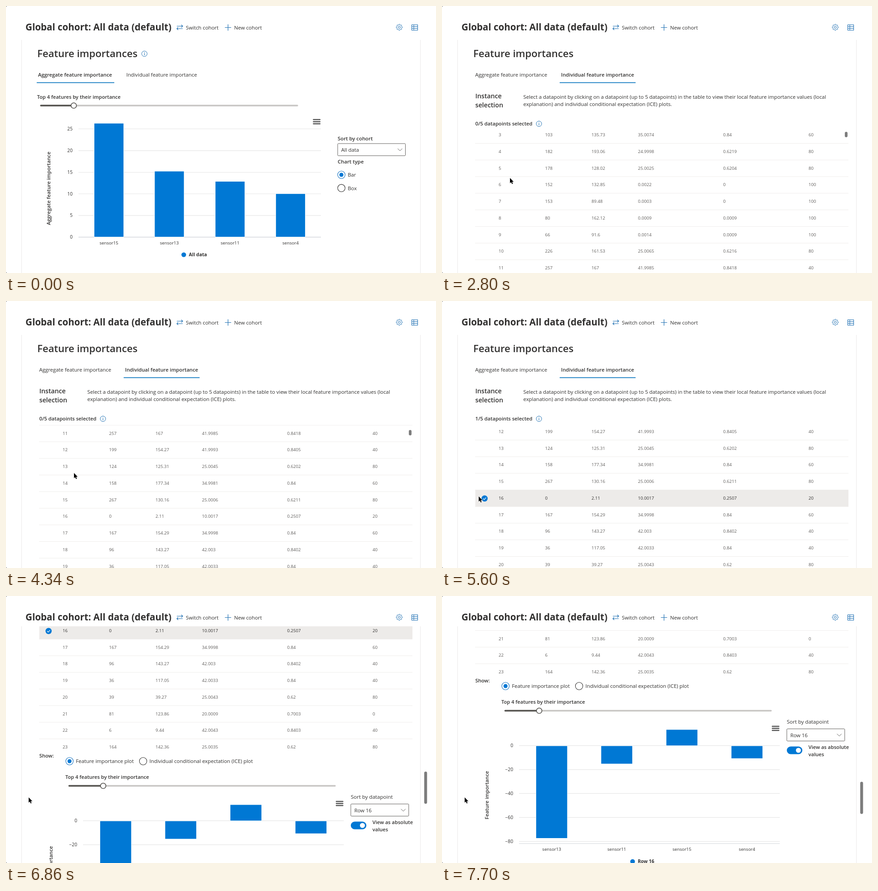
Animation of 949x590 px, one loop 8 s. Source, as an HTML page:

```html
<!DOCTYPE html>
<html lang="en">
<head>
<meta charset="utf-8">
<title>Feature importances</title>
<style>
  html, body { margin: 0; width: 100%; height: 100%; overflow: hidden; background: #fff; }
  svg { display: block; width: 949px; height: 590px; font-family: "Open Sans", "Noto Sans", sans-serif; }
</style>
</head>
<body>
<svg id="stage" viewBox="0 0 949 590"></svg>
<script>
const INK = '#323130', GREY = '#605e5c', BLUE = '#0078d4', ICON = '#2272b4';
const LOOP = 8000, TICK = 70;

// y is the middle of the capital letters
function text(x, y, str, o = {}) {
  const { size = 11.35, weight = 400, fill = INK, anchor = 'start', id = '' } = o;
  return `<text x="${x}" y="${(y + size * .357).toFixed(2)}" font-size="${size}" font-weight="${weight}"` +
    ` fill="${fill}" text-anchor="${anchor}"${id && ` id="${id}"`}>${str}</text>`;
}
const bold = (x, y, str, size = 11.2, o = {}) => text(x, y, str, { size, weight: 600, ...o });
const rect = (x, y, w, h, fill, more = '') =>
  `<rect x="${x}" y="${y}" width="${w}" height="${h}" fill="${fill}" ${more}/>`;
const path = (d, stroke, w = 1, more = '') =>
  `<path d="${d}" fill="none" stroke="${stroke}" stroke-width="${w}" ${more}/>`;
const circle = (x, y, r, fill, stroke = 'none', w = 1) =>
  `<circle cx="${x}" cy="${y}" r="${r}" fill="${fill}" stroke="${stroke}" stroke-width="${w}"/>`;
const group = (id, body, more = '') => `<g id="${id}" ${more}>${body}</g>`;

const info = (x, y) => circle(x, y, 6, 'none', ICON) +
  path(`M${x} ${y - 1}v4.2M${x} ${y - 3.4}v1.3`, ICON, 1.1);

const menu = (x, y) =>
  path(`M${x} ${y - 4.6}h14.4M${x} ${y}h14.4M${x} ${y + 4.6}h14.4`, '#555', 2.5, 'stroke-linecap="round"');

const slider = (x, end, thumb, y) =>
  path(`M${x} ${y}H${end}`, '#c8c6c4', 3.4, 'stroke-linecap="round"') +
  path(`M${x} ${y}H${thumb}`, '#55534f', 3.4, 'stroke-linecap="round"') +
  circle(thumb, y, 6, '#fff', '#55534f', 1.7);

const radio = (x, y, label, on) =>
  circle(x, y, 8.2, '#fff', on ? '#106ebe' : INK, 1.1) +
  (on ? circle(x, y, 4.5, BLUE) : '') + text(x + 14, y + .3, label);

const select = (x, y, w, label) =>
  rect(x, y, w, 26.8, '#fff', `stroke="${GREY}" rx="1.5"`) +
  text(x + 7.7, y + 14, label) +
  path(`M${x + w - 17} ${y + 11}l5 5 5-5`, GREY);

function chart(c) {
  let s = c.grid.map(([v, y]) =>
    path(`M${c.x0} ${y}H${c.x1}`, '#e6e6e6', 1.2) +
    text(c.x0 - 13, y, v, { size: 10.2, anchor: 'end' })).join('');
  s += path(`M${c.x0} ${c.base}H${c.x1}`, '#cfd3da', 1.2);
  c.bars.forEach(([name, x, top, bottom]) => {
    s += rect(x - 1, top - 1, c.w + 2, bottom - top + 2, '#fff') + rect(x, top, c.w, bottom - top, BLUE) +
      text(x + c.w / 2, c.base + 12.6, name, { size: 9.7, anchor: 'middle' });
  });
  const [tx, ty, title] = c.title;
  s += `<g transform="translate(${tx} ${ty}) rotate(-90)">${bold(0, 0, title, 11.2, { anchor: 'middle' })}</g>`;
  const [lx, ly, legend] = c.legend;
  return s + circle(lx, ly, 5.2, BLUE) + text(lx + 11.3, ly, legend, { size: 10.4, weight: 700 }) + menu(...c.menu);
}

// TrueY, PredictedY, settings1..3
const ROWS = `219 169.66 0.0009 0 100|68 64.87 9.9984 0.2508 20|67 55.71 35.0068 0.8417 60
103 135.73 35.0074 0.84 60|182 193.06 24.9998 0.6219 80|178 128.02 25.0025 0.6204 80
152 132.85 0.0022 0 100|153 89.48 0.0003 0 100|80 162.12 0.0009 0.0009 100
66 91.6 0.0014 0.0009 100|226 161.53 25.0065 0.6216 80|257 167 41.9985 0.8418 40
199 154.27 41.9993 0.8405 40|124 125.31 25.0045 0.6202 80|158 177.34 34.9981 0.84 60
267 130.16 25.0006 0.6211 80|0 2.11 10.0017 0.2507 20|167 154.29 34.9998 0.84 60
96 143.27 42.003 0.8402 40|36 117.05 42.0033 0.84 40|39 39.27 25.0043 0.62 80
81 123.86 20.0009 0.7003 0|6 9.44 42.0043 0.8403 40|164 142.36 25.0035 0.62 80`
  .split(/[|\n]/).map((r, i) => [i, ...r.trim().split(' ')]);
const COLS = [125, 227.5, 330, 432.5, 620.5, 809];
const HEADS = ['Index', 'TrueY', 'PredictedY', 'settings1', 'settings2', 'settings3'];
const PITCH = 36.75, PICKED = 16;

function table() {
  let s = HEADS.map((h, i) => bold(COLS[i], 307, h, 11.1)).join('') + path('M73 325H897', '#e9e7e5');
  ROWS.forEach((row, i) => {
    const y = 343 + i * PITCH;
    const cells = fill => row.map((v, c) => text(COLS[c], y, v, { size: 9.65, fill })).join('');
    s += path(`M73 ${y + 18.75}H897`, '#efedeb') + cells(GREY);
    if (i === PICKED) {
      s += group('picked', rect(73.5, y - 18, 823.5, 36.7, '#edebe9') +
        circle(94, y + .9, 6.8, BLUE) +
        path(`M90.8 ${y + 1}l2.3 2.3 4.2-4.4`, '#fff', 1.2) + cells(INK));
    }
  });
  return s;
}

const gear = () => {
  let d = '';
  for (let i = 0; i < 32; i++) {
    const a = (i - .5) / 32 * 2 * Math.PI, r = i % 4 < 2 ? 6.8 : 5.2;
    d += `${i ? 'L' : 'M'}${(868 + r * Math.cos(a)).toFixed(2)} ${(47 + r * Math.sin(a)).toFixed(2)}`;
  }
  return path(d + 'Z', ICON, 1) + circle(868, 47, 2.4, 'none', ICON);
};

const header = text(43, 47, 'Global cohort: All data (default)', { size: 20.55, weight: 700 }) +
  path('M377 44.5H390M387 41.5l3 3-3 3M390 50H377M380 47l-3 3 3 3', ICON, 1.1) +
  text(397, 47.5, 'Switch cohort') +
  path('M483 47.5H497M490 40.5V54.5', ICON, 1.2) + text(503.5, 47.5, 'New cohort') + gear() +
  path('M895.5 41.5H908.5V53.5H895.5ZM895.5 45.5H908.5M895.5 49.5H908.5M900 41.5V53.5', ICON, 1.1) +
  '<path d="M0 0H2L0 2ZM0 590H2L0 588Z" fill="#777"/>';

const aggregate = info(305.5, 105.5) +
  bold(68.5, 201, 'Top 4 features by their importance', 11.08) + slider(77, 643, 149.5, 220) +
  chart({
    x0: 160, x1: 695, base: 510.6, w: 64.3,
    grid: [[25, 271.5], [20, 319.7], [15, 367.5], [10, 415], [5, 462.8], [0, 510.6]],
    bars: [['sensor15', 195, 259.6, 510], ['sensor13', 328.3, 365.5, 510],
      ['sensor11', 462.3, 388, 510], ['sensor4', 595.8, 415.2, 510]],
    title: [94, 403, 'Aggregate feature importance'],
    legend: [392.3, 549.6, 'All data'], menu: [678.5, 255.7]
  }) +
  bold(732, 292.5, 'Sort by cohort', 11.35) + select(732, 304, 149.5, 'All data') +
  bold(732, 344, 'Chart type', 11.35) +
  radio(740.2, 373, 'Bar', true) + radio(740.2, 402.3, 'Box', false);

const plot = bold(73.5, 186.5, 'Show:') +
  radio(140.2, 199, 'Feature importance plot', true) +
  radio(302.6, 199, 'Individual conditional expectation (ICE) plot', false) +
  bold(131, 234.5, 'Top 4 features by their importance', 11.1) + slider(139.5, 726, 214.5, 253.5) +
  chart({
    x0: 170, x1: 745.5, base: 547, w: 68.5,
    grid: [['0', 330.7], ['−20', 383.6], ['−40', 436.4], ['−60', 489.4], ['−80', 542.4]],
    bars: [['sensor13', 207.8, 331.5, 535], ['sensor11', 351.4, 331.5, 370.6],
      ['sensor15', 495.2, 295.5, 330.3], ['sensor4', 638.8, 331.5, 358.7]],
    title: [99, 440, 'Feature importance'],
    legend: [420.6, 586.7, 'Row 16'], menu: [729, 292.5]
  }) +
  text(761, 278, 'Sort by datapoint', { size: 11.5 }) + select(761, 293.6, 127.8, 'Row 16') +
  rect(761, 332.4, 34.3, 17.2, BLUE, 'rx="8.6"') + circle(786.6, 341, 5.5, '#fff') +
  bold(808.8, 334, 'View as absolute', 11.1) + bold(808.8, 350, 'values', 11.1);

const individual =
  bold(73.5, 199, 'Instance', 14.2) + bold(73.5, 219.3, 'selection', 14.2) +
  text(179.5, 201, 'Select a datapoint by clicking on a datapoint (up to 5 datapoints) in the table to view their local feature importance values (local') +
  text(179.5, 217, 'explanation) and individual conditional expectation (ICE) plots.') +
  bold(73.5, 260.3, '0/5 datapoints selected', 11.2, { id: 'count' }) + info(214, 260.3) +
  `<g clip-path="url(#tableClip)">${group('rows', table())}${rect(889, 0, 6, 12, '#7d7d7d', 'id="rowBar" rx="3"')}</g>` +
  `<g transform="translate(0 525)">${plot}</g>`;

const page = path('M34.5 75V1300M914.5 75V1300', '#ebe9e8') +
  bold(69, 105, 'Feature importances', 22.05) +
  group('tabsA', bold(70.7, 152, 'Aggregate feature importance', 11.28) +
    text(265.5, 152, 'Individual feature importance', { size: 11.3, id: 'hoverTab' })) +
  group('tabsB', text(73.2, 152, 'Aggregate feature importance', { size: 11.4 }) +
    bold(262.8, 152, 'Individual feature importance', 11.2)) +
  path('M0 0', '#0f78c0', 1.8, 'id="underline"') +
  group('agg', aggregate) + group('ind', individual);

const OUTLINE = 'stroke="#fff" stroke-width="1.3" paint-order="stroke" stroke-linejoin="round"';
const cursors =
  group('arrow', `<path d="M0 0V11.6L2.7 9.2 4.5 13.4 6.4 12.6 4.6 8.4H8.2Z" fill="#000" ${OUTLINE}/>`) +
  group('hand', '<path d="M3 0c1 0 1.4.6 1.4 1.4V5.5l4.2.8c1.2.3 1.8 1 1.6 2.2l-.7 5H3.5L.2 9.2c-.8-1 .3-2 1.4-1.1V1.4C1.6.6 2 0 3 0Z" fill="#fff" stroke="#000" stroke-width=".9"/>') +
  group('beam', path('M-3-7Q0-7 0-5 0-7 3-7M0-5V5M-3 7Q0 7 0 5 0 7 3 7M-1.5 1.5h3', '#222', 1.2));

document.getElementById('stage').innerHTML =
  `<defs><clipPath id="pageClip"><rect y="67" width="949" height="523"/></clipPath>
  <clipPath id="tableClip"><rect x="73" y="274" width="824" height="426"/></clipPath></defs>
  ${header}<g clip-path="url(#pageClip)">${group('page', page)}</g>
  ${rect(923, 0, 6.3, 71, '#7d7d7d', 'id="pageBar" rx="3.1"')}${group('cursor', cursors)}`;

// [time, values...]
const POINTER = [[210, 422, 436], [350, 392, 362], [490, 338, 238], [630, 305, 168], [770, 305, 168],
  [840, 302, 167], [910, 302, 167], [980, 301, 161], [1190, 299, 155], [1330, 299, 155], [1540, 290, 186],
  [1820, 262, 242], [2030, 182, 342], [2170, 150, 380], [4690, 150, 380], [4970, 106, 408], [5180, 78, 428.5],
  [5530, 78, 428.5], [5670, 84, 435], [5740, 84, 435], [5950, 50, 445]];
const ROW_SCROLL = [[2240, 0], [2310, 8], [2520, 80], [2800, 168.5], [3010, 190], [3290, 190], [3570, 300],
  [4060, 300], [4200, 385], [4340, 455], [4480, 495.5]];
const PAGE_SCROLL = [[5880, 0], [6020, 35], [6300, 218], [6440, 262], [6510, 272], [6650, 272], [6720, 292],
  [6860, 359], [7000, 450], [7140, 506], [7280, 506], [7350, 507], [7490, 507], [7560, 512], [7700, 525]];
const UNDERLINE = [[1820, 254, 433.5], [2100, 259.7, 427.3]];
const BAR_FADE = [[4760, 1], [5040, 0]];

function at(steps, t) {
  const i = steps.findIndex(s => s[0] > t);
  if (i === 0) return steps[0].slice(1);
  if (i < 0) return steps[steps.length - 1].slice(1);
  const a = steps[i - 1], b = steps[i], k = (t - a[0]) / (b[0] - a[0]);
  return a.slice(1).map((v, j) => v + (b[j + 1] - v) * k);
}

const el = {};
document.querySelectorAll('[id]').forEach(e => el[e.id] = e);
const show = (id, on) => el[id].setAttribute('display', on ? 'inline' : 'none');
const move = (id, x, y) => el[id].setAttribute('transform', `translate(${x} ${y})`);

function draw(t) {
  const second = t >= 1400, picked = t >= 5390;
  show('agg', !second); show('tabsA', !second);
  show('ind', second); show('tabsB', second);
  show('picked', picked);
  el.count.textContent = `${picked ? 1 : 0}/5 datapoints selected`;
  el.hoverTab.setAttribute('fill', t >= 980 ? '#111' : INK);

  const [x0, x1] = second ? at(UNDERLINE, t) : [67.8, 239];
  el.underline.setAttribute('d', `M${x0} 169.4H${x1}`);

  const [rows] = at(ROW_SCROLL, t), [scroll] = at(PAGE_SCROLL, t);
  move('rows', 0, -rows);
  move('page', 0, -scroll);
  show('rowBar', t >= 2310 && t < 5040);
  el.rowBar.setAttribute('y', 274 + rows * .0244);
  el.rowBar.setAttribute('opacity', at(BAR_FADE, t)[0]);
  show('pageBar', scroll > 0);
  el.pageBar.setAttribute('y', 339.4 + scroll * .1355);

  const hand = t >= 980 && t < 1470, beam = t >= 1540 && t < 1890;
  show('cursor', t >= 210);
  show('hand', hand); show('beam', beam); show('arrow', !hand && !beam);
  move('cursor', ...at(POINTER, t));
}

const start = performance.now();
function frame() {
  const t = (performance.now() - start) % LOOP;
  draw(Math.floor(t / TICK) * TICK);
  requestAnimationFrame(frame);
}
draw(0);
requestAnimationFrame(frame);
</script>
</body>
</html>
```
